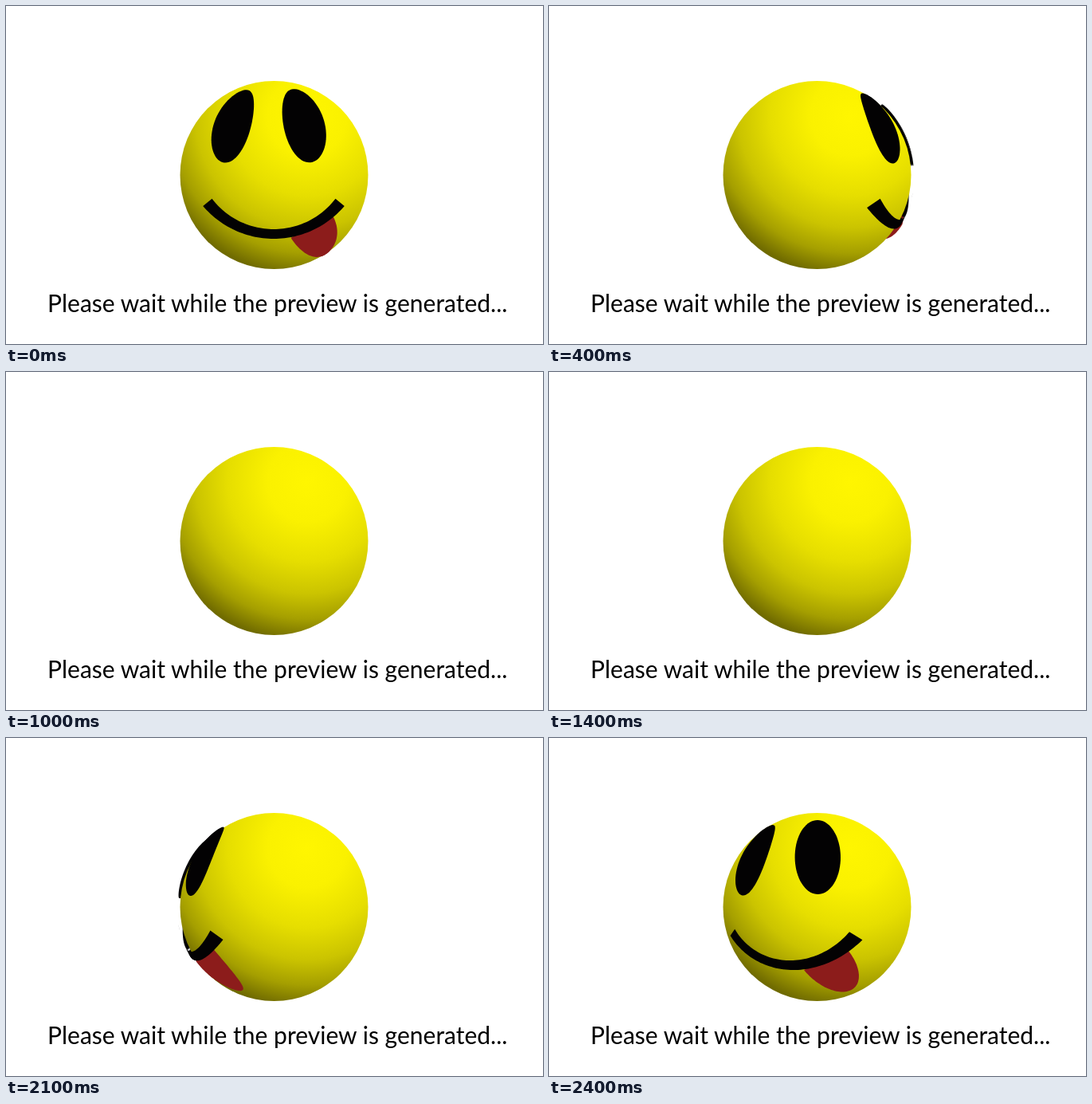
Write an HTML page that moves like this. It is 674 by 424 pixels and loops after 2.5 s.

```html
<!DOCTYPE html>
<html lang="en">
<head>
<meta charset="utf-8">
<title>Please wait</title>
<style>
  html, body { margin: 0; width: 100%; height: 100%; overflow: hidden; background: #fff; }
  svg { display: block; width: 674px; height: 424px; }
  text { font: 30px Lato, Carlito, sans-serif; }
</style>
</head>
<body>
<svg viewBox="0 0 674 424">
  <defs>
    <radialGradient id="light" gradientUnits="userSpaceOnUse" cx="378" cy="138" r="200">
      <stop offset="0" stop-color="#fff600"/>
      <stop offset=".25" stop-color="#faf100"/>
      <stop offset=".5" stop-color="#e6de00"/>
      <stop offset=".7" stop-color="#cbc400"/>
      <stop offset=".86" stop-color="#a59f00"/>
      <stop offset="1" stop-color="#706b00"/>
    </radialGradient>
  </defs>
  <g id="behind"></g>
  <circle cx="336.5" cy="212" r="118" fill="url(#light)"/>
  <g id="front"></g>
  <text x="340.7" y="383.5" text-anchor="middle">Please wait while the preview is generated...</text>
</svg>
<script>
const CX = 336.5, CY = 212, RADIUS = 117.5;
const CAMERA = 2.85;                                   // distance in sphere radii
const FOCAL = RADIUS * Math.sqrt(CAMERA ** 2 - 1);
const STEP_MS = 100, STEPS = 25;
const WALL_LAYERS = 5;
const rad = deg => deg * Math.PI / 180;

const sample = (n, from, to, point) =>
  Array.from({ length: n + 1 }, (_, i) => point(from + (to - from) * i / n));

// Casts a stage point, seen face-on, onto a sphere of radius r.
function unproject([px, py], r) {
  const u = (px - CX) / FOCAL, v = (py - CY) / FOCAL, s = u * u + v * v;
  const z = (s * CAMERA + Math.sqrt(Math.max(0, r * r * (1 + s) - s * CAMERA ** 2))) / (1 + s);
  return [u * (CAMERA - z), v * (CAMERA - z), z];
}

function turn([x, y, z], angle) {
  const c = Math.cos(angle), s = Math.sin(angle);
  return [x * c + z * s, y, z * c - x * s];
}

const horizonOf = r => r * r / CAMERA;

// Moves points past the horizon back onto it.
function clampToHorizon([x, y, z], r) {
  const horizon = horizonOf(r);
  if (z >= horizon) return [x, y, z];
  const k = Math.sqrt(r * r - horizon ** 2) / Math.hypot(x, y);
  return [x * k, y * k, horizon];
}

function project([x, y, z]) {
  const k = FOCAL / (CAMERA - z);
  return (CX + x * k).toFixed(2) + ',' + (CY + y * k).toFixed(2);
}

const eye = sample(72, 0, 2 * Math.PI, a => [CX + 28.7 * Math.cos(a), 149.5 + 46.5 * Math.sin(a)]);

const tongue = sample(60, 0, Math.PI, a => {
  const c = Math.cos(a), s = Math.sin(a);
  return [347.5 + 27.5 * c + 31 * s, 278.5 - 12.5 * c + 38 * s];
});

const mouthEdge = (side, from, to) => sample(60, from, to, a => {
  const d = 107 + side * (6 + 1.6 * a * a);
  return [336 + d * Math.sin(a), 179 + d * Math.cos(a)];
});
const mouth = [...mouthEdge(1, -.89, .89), ...mouthEdge(-1, .89, -.89)];

function addPath(layer, color) {
  const path = document.createElementNS('http://www.w3.org/2000/svg', 'path');
  path.setAttribute('fill', color);
  return document.getElementById(layer).appendChild(path);
}

const feature = (outline, r, color, longitude = 0) => ({
  r,
  points: outline.map(p => turn(unproject(p, r), rad(longitude))),
  behind: addPath('behind', color),
  front: addPath('front', color)
});

const features = [
  feature(eye, 1.03, '#030203', -21),
  feature(eye, 1.03, '#030203', 14.7),
  feature(tongue, 1.045, '#8c1c1b', 14.4),
  feature(mouth, 1.035, '#030203')
];

const outlinePath = points => 'M' + points.map(project).join('L') + 'Z';

// Stacks the outline from the sphere's surface up to its own height.
const wallPath = (points, r) => sample(WALL_LAYERS - 1, 1 / r, 1, k =>
  outlinePath(points.map(p => p.map(v => v * k)))).join('');

function draw(time) {
  const yaw = 2 * Math.PI * (Math.floor(time / STEP_MS) % STEPS) / STEPS;
  for (const { points, r, behind, front } of features) {
    const turned = points.map(p => turn(p, yaw));
    const facing = turned.some(p => p[2] > horizonOf(r));
    behind.setAttribute('d', wallPath(turned, r));
    front.setAttribute('d', facing ? outlinePath(turned.map(p => clampToHorizon(p, r))) : '');
  }
}

const start = performance.now();
function tick() {
  draw(performance.now() - start);
  requestAnimationFrame(tick);
}
tick();
</script>
</body>
</html>
```
